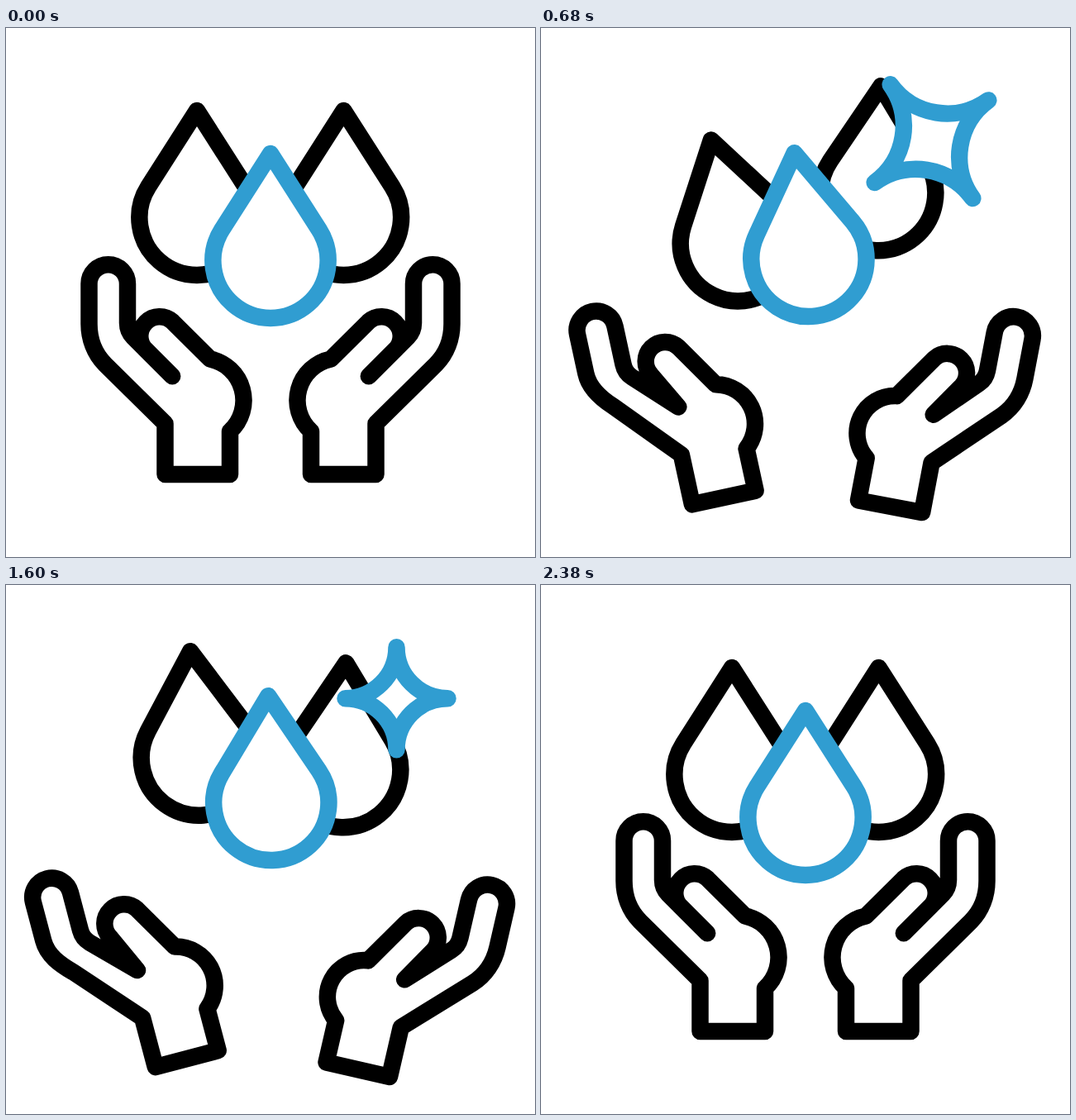
Animation of 640 by 640 pixels, one loop 2400 ms. Source, as an HTML page:

```html
<!DOCTYPE html>
<html lang="en">
<head>
<meta charset="utf-8">
<title>Water care</title>
<style>
  html, body { margin: 0; width: 100%; height: 100%; overflow: hidden; background: #fff; }
  svg { display: block; width: 100%; height: 100%; }
  path { stroke: #000; stroke-width: 20.5; stroke-linecap: round; stroke-linejoin: round; fill: #fff; }
  .hand { fill: none; }
  .blue { stroke: #309dd1; }
</style>
</head>
<body>
<svg viewBox="0 0 640 640">
  <path class="hand" id="leftHand"/>
  <path class="hand" id="rightHand" transform="matrix(-1 0 0 1 640 0)"/>
  <path class="drop"/>
  <path class="drop"/>
  <path class="drop blue"/>
  <path class="blue" id="star"/>
</svg>
<script>
const LOOP = 2400, HALF = 1190, RAD = Math.PI / 180;
const $ = id => document.getElementById(id);

// Eased interpolation through [time, value] keys.
function track(keys, t) {
  if (t <= keys[0][0]) return keys[0][1];
  for (let i = 1; i < keys.length; i++) {
    const [t0, v0] = keys[i - 1], [t1, v1] = keys[i];
    if (t < t1) return v0 + (v1 - v0) * (1 - Math.cos(Math.PI * (t - t0) / (t1 - t0))) / 2;
  }
  return keys[keys.length - 1][1];
}

// cubic-bezier(2/3, 0, 1/3, 1), solved by bisection.
function ease(x) {
  let lo = 0, hi = 1;
  for (let i = 0; i < 24; i++) {
    const s = (lo + hi) / 2;
    if (2 * s - 3 * s * s + 2 * s ** 3 < x) lo = s; else hi = s;
  }
  return lo * lo * (3 - 2 * lo);
}

// The palm turns about its centre while the thumb only shifts.
function handPath(p, { turn, palm, thumb, bend, tighten }) {
  const c = Math.cos(turn * p * RAD), s = Math.sin(turn * p * RAD);
  const P = (x, y, extra = [0, 0]) => {
    const dx = x - 193.5, dy = y - 413;
    return `${193.5 + (palm[0] + extra[0]) * p + dx * c - dy * s} ` +
      `${413 + (palm[1] + extra[1]) * p + dx * s + dy * c} `;
  };
  const T = (x, y) => `${x + thumb[0] * p} ${y + thumb[1] * p} `;
  const r = 51 - tighten * p;
  return `M${P(192.5, 540)}L${P(192.5, 478.5)}L${P(120, 407, bend)}` +
    `C${P(107, 394, bend)}${P(100.5, 376)}${P(100.5, 358)}L${P(100.5, 309.5)}` +
    `A23.25 23.25 0 0 1 ${P(147, 309.5)}L${P(147, 357)}Q${P(147, 367)}${P(154, 374)}` +
    `L${P(201.2, 421.2)}L${T(168.4, 388.6)}A23.5 23.5 0 0 1 ${T(201.6, 355.4)}` +
    `L${T(247, 400.5)}A${r} ${r} 0 0 1 ${P(271, 488)}L${P(271, 540)}Z`;
}

const hands = {
  leftHand: { turn: -17.6, palm: [-52.5, 56], thumb: [-51, 44], bend: [5, -6], tighten: 4.5 },
  rightHand: { turn: -15.4, palm: [-53.5, 69], thumb: [-53.5, 64], bend: [0, 0], tighten: 8 }
};

// Each drop repeats the same fading bounce, a little later than the one before.
const bounce = [[0, 0], [385, 53.5], [745, -36.5], [1090, 61], [1445, -21], [1795, 16], [2120, 0]];
const swing = [[0, 0], [420, -16.8], [905, 16], [1320, -6], [1720, 3.5], [2080, 0]];
const drops = [
  { x: 231, y: 200, delay: 180 },
  { x: 408.5, y: 200, delay: 0 },
  { x: 320, y: 252, delay: 90 }
];
const dropNodes = document.querySelectorAll('.drop');
dropNodes.forEach(n => n.setAttribute('d', 'M0-100L-58.8-7.9A69.6 69.6 0 1 0 58.8-7.9Z'));

const starSize = [[520, 0], [680, 1.37], [805, 1], [1640, 1], [1780, 1.4], [1940, 0]];
const starTurn = [[520, -90], [805, 0], [1640, 0], [2000, 90]];

function starPath(r) {
  const arc = `A${r} ${r} 0 0 0 `;
  return `M0 ${-r}${arc}${r} 0${arc}0 ${r}${arc}${-r} 0${arc}0 ${-r}Z`;
}

function draw(t) {
  const open = ease(Math.max(0, 1 - Math.abs(t / HALF - 1)));
  for (const id in hands) $(id).setAttribute('d', handPath(open, hands[id]));

  drops.forEach(({ x, y, delay }, i) => {
    const local = t - delay;
    dropNodes[i].setAttribute('transform',
      `translate(${x} ${y + track(bounce, local)}) rotate(${track(swing, local)})`);
  });

  const size = track(starSize, t), star = $('star');
  star.style.display = size > 0 ? '' : 'none';
  star.setAttribute('d', starPath(62 * size));
  star.setAttribute('transform', `translate(472.5 137.2) rotate(${track(starTurn, t)})`);
}

const start = performance.now();
function frame() {
  draw((performance.now() - start) % LOOP);
  requestAnimationFrame(frame);
}
frame();
</script>
</body>
</html>
```
